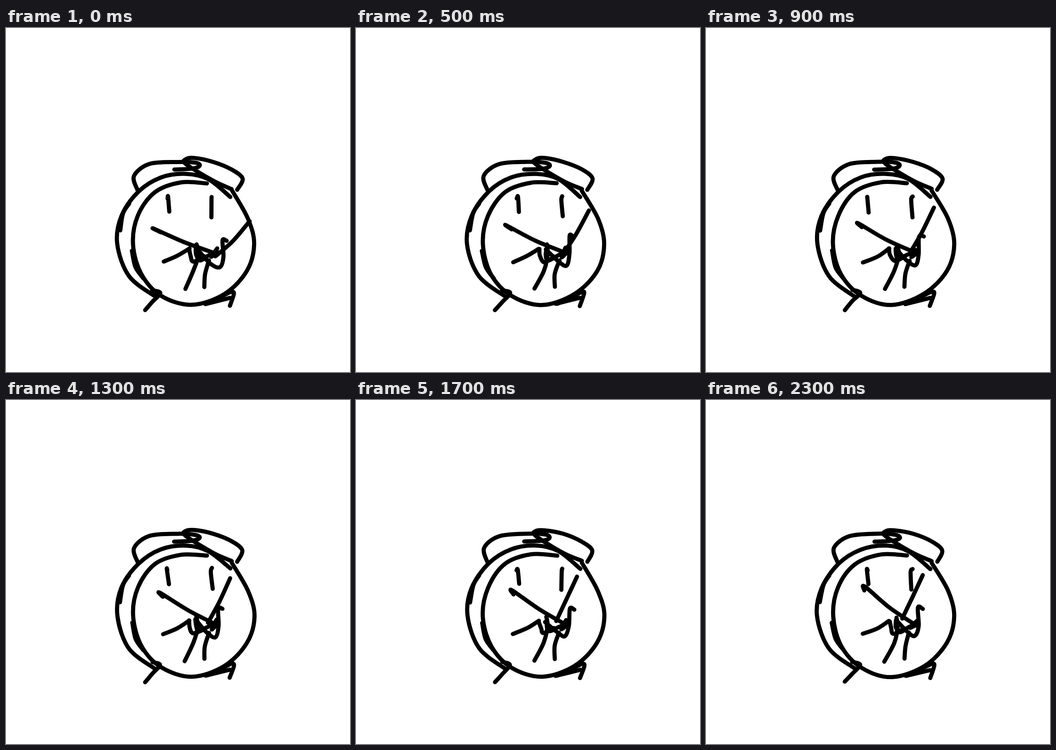
An HTML page for the animation above (2400 ms loop, 748 by 748 pixels).

```html
<!DOCTYPE html>
<html lang="en">
<head>
<meta charset="utf-8">
<title>Alarm clock</title>
<style>
  html, body { margin: 0; width: 100%; height: 100%; overflow: hidden; background: #fff; }
  svg { display: block; width: 100%; height: 100%; }
  path { fill: none; stroke: #000; stroke-width: 9; stroke-linecap: round; stroke-linejoin: round; }
</style>
</head>
<body>
<svg id="stage" viewBox="0 0 748 748"></svg>
<script>
const STEP = 100, STEPS = 24;

// Key points of each stroke, and how far its points tremble
const strokes = [
  stroke("face", 0.7, "437,338 380,336 324,357 287,408 276,470 294,535 338,582 404,602 475,578 524,528 540,470 526,415 491,354"),
  stroke("shell", 0.7, "325,585 268,540 242,470 251,409 288,356 337,325 392,317 440,329 488,367"),
  stroke("side", 0.7, "268,382 255,403 248,440"),
  stroke("rim", 0.7, "274,484 282,520 299,544"),
  stroke("left foot", 0.7, "318,570 335,576 318,595 302,613"),
  stroke("right foot", 0.7, "434,600 487,587"),
  stroke("right heel", 0.7, "438,599 481,578 492,573 496,578 487,604"),
  stroke("left bell", 0.5, "287,355 278,322 311,296 372,291 412,293 421,300 405,306 366,308"),
  stroke("right bell", 0.5, "503,352 514,327 490,307 450,291 410,283 391,285 391,296 450,332 491,350"),
  stroke("left eye", 1.5, "350,370 351,368 354,400"),
  stroke("right eye", 2, "449,366 446,373 448,411"),
  stroke("arm", 1.2, "342,509 373,496 398,480"),
  stroke("elbow", 2, "398,480 401,495 409,508 430,497"),
  stroke("left leg", 1.5, "414,472 418,493 409,527 389,568"),
  stroke("right leg", 1, "432,563 433,535 442,506"),
  stroke("loop", 2.5, "473,454 463,452 463,490 455,514 438,506 413,481"),
  stroke("knot", 2.5, "413,477 414,494 420,504 440,494 460,486 446,497 457,480"),
  stroke("hour hand", 1),
  stroke("minute hand", 1)
];

function stroke(name, wobble, text = "") {
  const points = text.split(" ").map(pair => pair.split(",").map(Number));
  return { name, wobble, points };
}

const mix = (a, b, f) => a.map((v, i) => v + (b[i] - v) * f);

// Strokes that travel as well as tremble
const moves = {
  "hour hand"(p) {
    const tip = mix([321, 436], [345, 406], p), end = [458, 490];
    const [x, y] = mix(tip, end, 0.5);
    return [[tip[0] + 15 * (1 - p), tip[1] + 8], tip, [x - 1, y + 3], end];
  },
  "minute hand"(p) {
    const angle = (-38 - 36 * Math.sqrt(p)) * Math.PI / 180;
    const tip = [440 + 114 * Math.cos(angle), 490 + 114 * Math.sin(angle)];
    const end = mix([456, 497], [427, 475], p);
    const [x, y] = mix(tip, end, 0.5);
    return [tip, [x, y + 5 * (1 - p)], end];
  },
  loop(p, points) {
    const slip = 8 * Math.exp(-8 * p);
    return points.map(([x, y]) => [x + slip, y + slip]);
  }
};

function random(seed) {
  const v = Math.sin(seed * 12.9898 + 4.1) * 43758.5453;
  return v - Math.floor(v);
}

function tremble(points, seed, size) {
  return points.map((p, i) => p.map((v, axis) =>
    v + (random(seed + i * 2.3 + axis * 0.71) * 2 - 1) * size));
}

// Catmull-Rom curve through the points
function curve(points) {
  const at = i => points[Math.max(0, Math.min(points.length - 1, i))];
  let d = "M" + points[0];
  for (let i = 0; i < points.length - 1; i++) {
    const [a, b, c, e] = [at(i - 1), at(i), at(i + 1), at(i + 2)];
    const c1 = b.map((v, k) => v + (c[k] - a[k]) / 6);
    const c2 = c.map((v, k) => v - (e[k] - b[k]) / 6);
    d += `C${c1} ${c2} ${c}`;
  }
  return d;
}

const stage = document.getElementById("stage");
for (const s of strokes) {
  s.path = stage.appendChild(document.createElementNS("http://www.w3.org/2000/svg", "path"));
}

function draw(step) {
  const progress = step / (STEPS - 1);
  strokes.forEach(({ name, wobble, points, path }, i) => {
    const move = moves[name];
    const pose = move ? move(progress, points) : points;
    path.setAttribute("d", curve(tremble(pose, step * 31 + i * 7, wobble)));
  });
}

let shown = -1;
const start = performance.now();
function tick() {
  const step = Math.floor((performance.now() - start) / STEP) % STEPS;
  if (step !== shown) draw(shown = step);
  requestAnimationFrame(tick);
}
tick();
</script>
</body>
</html>
```
